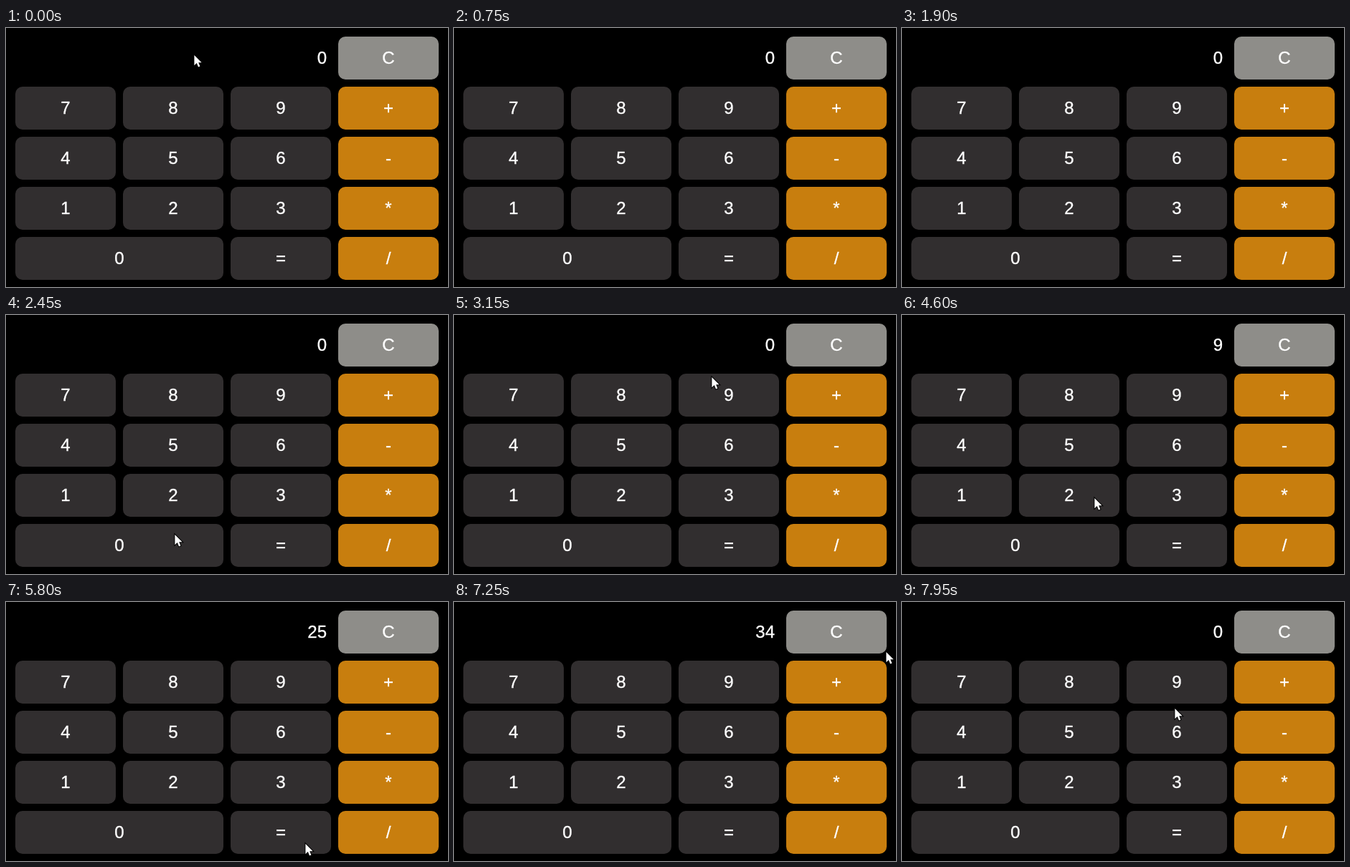
An HTML page for the animation above (8 s loop, 616 by 362 pixels).

```html
<!DOCTYPE html>
<html lang="en">
<head>
<meta charset="utf-8">
<title>Calculator</title>
<style>
  html, body { margin: 0; width: 100%; height: 100%; overflow: hidden; background: #000; }
  svg { display: block; width: 100%; height: 100%; }
  text {
    font: 24px "Liberation Sans", Arial, sans-serif;
    fill: #fff; stroke: #fff; stroke-width: 0.35; text-anchor: middle;
  }
  #display { text-anchor: end; }
  #cursor { fill: #fff; stroke: #000; stroke-width: 2; paint-order: stroke; }
</style>
</head>
<body>
<svg viewBox="0 0 616 362">
  <rect width="616" height="362"/>
  <g id="keys"></g>
  <text id="display" x="447" y="50"></text>
  <path id="cursor" d="M.4 1V15.2L3.8 12L6 17.4L8.4 16.4L6.2 11.2H10.6Z"/>
</svg>
<script>
const LOOP = 8000, STEP = 50;
const DARK = '#312e2f', ORANGE = '#c87e0e', GREY = '#8e8d89';
const byId = id => document.getElementById(id);
const display = byId('display'), cursor = byId('cursor');

function add(parent, tag, attrs, label = '') {
  const el = document.createElementNS('http://www.w3.org/2000/svg', tag);
  for (const name in attrs) el.setAttribute(name, attrs[name]);
  el.textContent = label;
  parent.append(el);
}

function addKey(label, col, row, span = 1) {
  const x = 13 + col * 150, y = 12 + row * 70, width = span * 150 - 10;
  const fill = label === 'C' ? GREY : col === 3 ? ORANGE : DARK;
  add(byId('keys'), 'rect', { x, y, width, height: 60, rx: 10, fill });
  add(byId('keys'), 'text', { x: x + width / 2, y: y + 38 }, label);
}

addKey('C', 3, 0);
['789+', '456-', '123*'].forEach((row, i) =>
  [...row].forEach((label, col) => addKey(label, col, i + 1)));
addKey('0', 0, 4, 2);
addKey('=', 2, 4);
addKey('/', 3, 4);

const presses = { 3250: '9', 4000: '+', 4850: '2', 5300: '5', 5900: '=', 7750: 'C' };

// Works the sum from the keys pressed so far
function reading(t) {
  let shown = 0, sum = 0, fresh = true;
  for (const [time, key] of Object.entries(presses)) {
    if (time > t) break;
    if (key === 'C') shown = sum = 0;
    else if (key === '+') sum = shown;
    else if (key === '=') shown += sum;
    else shown = (fresh ? 0 : shown * 10) + Number(key);
    fresh = isNaN(key);
  }
  return shown;
}

// Glides from the last resting place: start, duration, x, y
const glides = [
  [0, 50, 262, -40],
  [1000, 1, 202, 364],
  [2350, 750, 359, 86],
  [3250, 350, 612, 98],
  [3600, 400, 540, 107],
  [4000, 600, 268, 255],
  [4800, 350, 250, 190],
  [5300, 500, 417, 337],
  [5950, 150, 426, 374],
  [7000, 1, 630, 75],
  [7200, 400, 484, 46],
  [7850, 100, 380, 148]
];

const easeOut = p => Math.sin(Math.min(1, p) * Math.PI / 2);

function cursorAt(t) {
  let x = 262, y = 37;
  for (const [start, duration, toX, toY] of glides) {
    if (t < start) break;
    const p = easeOut((t - start) / duration);
    x += (toX - x) * p;
    y += (toY - y) * p;
  }
  return [Math.round(x), Math.round(y)];
}

function draw(time) {
  const t = Math.floor(time % LOOP / STEP) * STEP;
  display.textContent = reading(t);
  cursor.setAttribute('transform', `translate(${cursorAt(t)})`);
}

const began = performance.now();
function tick() {
  draw(performance.now() - began);
  requestAnimationFrame(tick);
}
tick();
</script>
</body>
</html>
```
